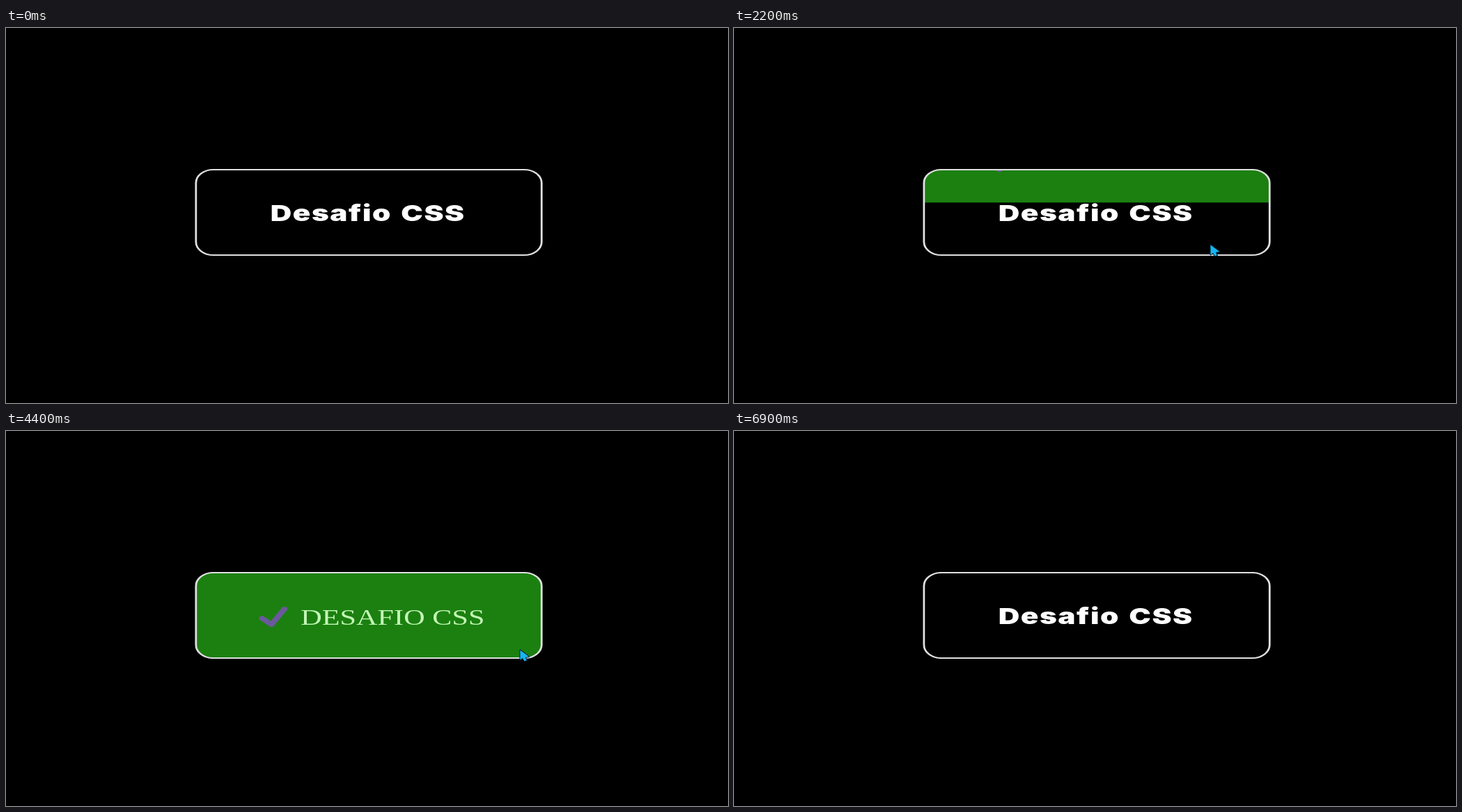
An HTML page for the animation above (7200 ms loop, 1037x540 px).

```html
<!DOCTYPE html>
<html lang="pt">
<head>
<meta charset="utf-8">
<title>Desafio CSS</title>
<style>
  html, body { margin: 0; width: 100%; height: 100%; overflow: hidden; background: #000; }
  svg { display: block; width: 100%; height: 100%; }
  .label { font: 900 32px "Arial Black", Inter, sans-serif; letter-spacing: 1.15px; word-spacing: 2.6px; fill: #fff; }
  .hover { font: 32px "Liberation Serif", "Times New Roman", serif; fill: #c4f6b6; }
  .check { fill: none; stroke: #6a5a9b; stroke-width: 6.6; stroke-linecap: round; stroke-linejoin: round; }
  .frame { fill: none; stroke: #e0e0e0; stroke-width: 2.1; }
  #cursor { fill: #16b5ee; stroke: #03202c; stroke-width: 2; paint-order: stroke; stroke-linejoin: round; }
</style>
</head>
<body>
<svg viewBox="0 0 1037 540">
  <defs>
    <clipPath id="inside"><rect x="207.4" y="204.6" width="374.8" height="121.8" rx="18.5"/></clipPath>
  </defs>
  <!-- the page is seen through a wide aspect ratio -->
  <g transform="scale(1.32 1)">
    <text class="label" x="287.7" y="278">Desafio CSS</text>
    <g clip-path="url(#inside)">
      <g id="panel">
        <rect x="206" y="203" width="378" height="123.2" fill="#1b8010"/>
        <path class="check" d="M278.6 269.8 L288.8 278.8 L303 256.2"/>
        <text class="hover" x="320.7" y="279.3">DESAFIO CSS</text>
      </g>
    </g>
    <rect class="frame" x="206.7" y="204" width="376.1" height="123" rx="19"/>
  </g>
  <path id="cursor" d="M.5 .5 V14.4 L4 12 L6.7 16.2 L9.8 15.2 L7.9 11 L13.2 10 Z"/>
</svg>
<script>
const LOOP = 7200, STEP = 100, SLIDE = 500, HEIGHT = 122;
const panel = document.getElementById("panel");
const cursor = document.getElementById("cursor");

// times at which the pointer enters and leaves the button
const visits = [[575, 1348], [2080, 2950], [3880, 5200], [5600, 6350]];

// pointer moves: start, end, destination
const entry = [964, 507];
const moves = [
  [400, 1200, 553, 259], [1300, 1400, 661, 363], [1400, 2200, 684, 312],
  [2900, 3200, 792, 407], [3500, 4100, 738, 315], [5200, 5400, 830, 407],
  [5500, 5700, 738, 313], [6300, 6600, 750, 105]
];

// CSS "ease": cubic-bezier(.25, .1, .25, 1)
function ease(x) {
  if (x <= 0) return 0;
  if (x >= 1) return 1;
  const curve = (a, b, u) => 3 * a * u * (1 - u) ** 2 + 3 * b * u * u * (1 - u) + u ** 3;
  let lo = 0, hi = 1;
  for (let i = 0; i < 20; i++) {
    const mid = (lo + hi) / 2;
    if (curve(.25, .25, mid) < x) lo = mid; else hi = mid;
  }
  return curve(.1, 1, lo);
}

const shownAt = t => visits.reduce(
  (sum, [enter, leave]) => sum + ease((t - enter) / SLIDE) - ease((t - leave) / SLIDE), 0);

const pointerAt = t => moves.reduce(([x, y], [from, to, nx, ny]) => {
  const p = ease((t - from) / (to - from));
  return [x + (nx - x) * p, y + (ny - y) * p];
}, entry);

function draw(now) {
  const t = Math.floor((now % LOOP) / STEP) * STEP;
  const visible = t >= moves[0][0] && t <= moves[moves.length - 1][1];
  panel.setAttribute("transform", `translate(0 ${(shownAt(t) - 1) * HEIGHT})`);
  cursor.setAttribute("transform", `translate(${pointerAt(t)})`);
  cursor.style.display = visible ? "" : "none";
}

const begin = performance.now();
function tick() {
  draw(performance.now() - begin);
  requestAnimationFrame(tick);
}
tick();
</script>
</body>
</html>
```
